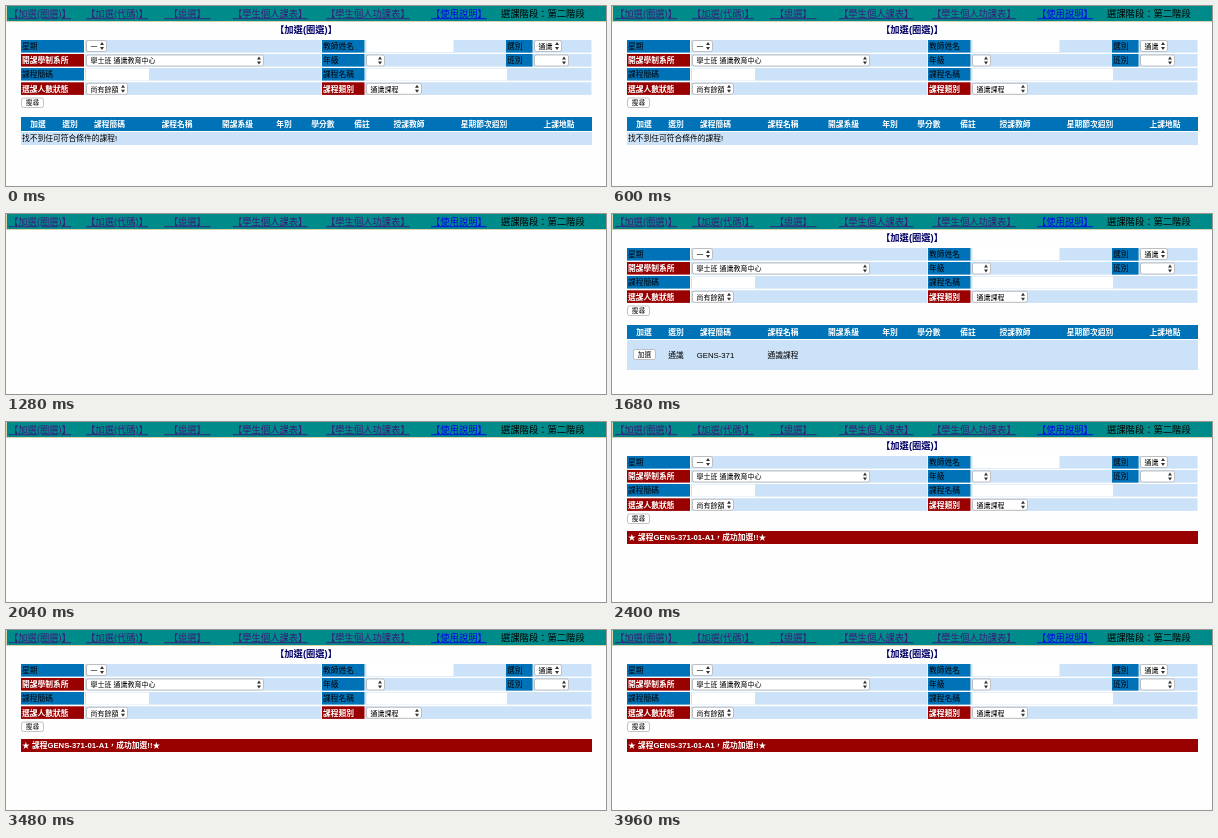
An HTML page for the animation above (4000 ms loop, 600 by 180 pixels).

```html
<!DOCTYPE html>
<html lang="zh-Hant">
<head>
<meta charset="utf-8">
<style>
html, body { margin: 0; width: 100%; height: 100%; overflow: hidden; background: #fefefe; }
svg { display: block; width: 600px; height: 180px; }
text { font-family: "Liberation Sans", "Noto Sans CJK TC", "Noto Sans CJK", sans-serif; white-space: pre; }
</style>
</head>
<body>
<svg id="stage" viewBox="0 0 600 180"></svg>
<script>
const BLUE = '#0072b8', RED = '#990000', PALE = '#cce2f8', TEAL = '#008b8b';
const LOOP = 4000;

const rect = (x, y, w, h, fill, extra = '') =>
  `<rect x="${x}" y="${y}" width="${w}" height="${h}" fill="${fill}" ${extra}/>`;
const text = (x, y, str, { size = 7.75, fill = '#000', weight = 400, anchor = 'start', line = 'none' } = {}) =>
  `<text x="${x}" y="${y}" font-size="${size}" fill="${fill}" font-weight="${weight}" text-anchor="${anchor}" text-decoration="${line}">${str}</text>`;
const label = (x, y, w, str, required) =>
  rect(x, y, w, 12.6, required ? RED : BLUE) +
  text(x + 1, y + 9.2, str, required ? { fill: '#fff', weight: 700 } : {});
const box = (x, y, w, h) => rect(x + .5, y + .5, w - 1, h - 1, '#fff', 'rx="2" stroke="#aaa" stroke-width=".7"');

function select(x, y, w, str = '') {
  const a = x + w - 5, m = y + 6;
  return box(x, y, w, 12) + text(x + 4.5, y + 8.8, str, { size: 7 }) +
    `<path d="M${a - 2} ${m - 1}l2-3 2 3zM${a - 2} ${m + 1}l2 3 2-3z" fill="#333"/>`;
}

function menu() {
  const links = [[3, '【加選(圈選)】'], [80, '【加選(代碼)】'], [158, '　【退選】　'],
    [227, '【學生個人課表】'], [320, '【學生個人功課表】'], [425, '【使用說明】']];
  return rect(1, 0, 599, 15, TEAL) + rect(0, 15, 600, 1, '#d9d2ae') + rect(0, 0, 1, 15, '#d9d2ae') +
    links.map(([x, str]) => text(x, 11.3, str, {
      size: 9.3, line: 'underline', fill: x === 425 ? '#0000ee' : '#3b1a7a'
    })).join('') +
    text(495, 11.3, '選課階段：第二階段', { size: 9.3, weight: 500 });
}

function form() {
  const rows = [34, 48, 62, 76.3];
  const [r1, r2, r3, r4] = rows;
  return text(300, 26.5, '【加選(圈選)】', { size: 9.3, weight: 700, fill: '#000066', anchor: 'middle' }) +
    rows.map(y => rect(79, y, 236.5, 12.6, PALE) + rect(359, y, 226.5, 12.6, PALE)).join('') +
    label(15, r1, 63, '星期') + label(316, r1, 42.5, '教師姓名') + label(500, r1, 26.5, '選別') +
    label(15, r2, 63, '開課學制系所', true) + label(316, r2, 42.5, '年級') + label(500, r2, 26.5, '班別') +
    label(15, r3, 63, '課程簡碼') + label(316, r3, 42.5, '課程名稱') +
    label(15, r4, 63, '選課人數狀態', true) + label(316, r4, 42.5, '課程類別', true) +
    rect(360.5, r1, 87, 12, '#fff') + rect(80, r3 + .5, 63, 12, '#fff') + rect(360.5, r3 + .5, 140.5, 12, '#fff') +
    select(80, r1, 21, '一') + select(528, r1, 28, '通識') +
    select(80, r2 + .5, 178, '學士班 通識教育中心') + select(360, r2 + .5, 19) + select(528, r2 + .5, 35) +
    select(80, r4 + .5, 42, '尚有餘額') + select(360, r4 + .5, 56, '通識課程') +
    box(15, 91.5, 23, 10.5) + text(26.5, 99.3, '搜尋', { size: 6.7, anchor: 'middle' });
}

function tableHead() {
  const columns = [[32, '加選'], [64, '選別'], [103.5, '課程簡碼'], [171, '課程名稱'], [231.5, '開課系級'],
    [278, '年別'], [317, '學分數'], [356, '備註'], [403, '授課教師'], [478, '星期節次週別'], [553, '上課地點']];
  return rect(15, 111, 571, 14, BLUE) +
    columns.map(([x, str]) => text(x, 120.8, str, { fill: '#fff', weight: 700, anchor: 'middle' })).join('');
}

const emptyResult = rect(15, 126, 571, 13, PALE) + text(16, 135.2, '找不到任可符合條件的課程!');
const foundCourse = rect(15, 126, 571, 30, PALE) + box(21, 135, 23, 11) +
  text(32.5, 143, '加選', { size: 6.7, anchor: 'middle' }) +
  text(64, 143.5, '通識', { anchor: 'middle' }) +
  text(103.5, 143.5, 'GENS-371', { anchor: 'middle' }) +
  text(171, 143.5, '通識課程', { anchor: 'middle' });
const success = rect(15, 109, 571, 13, RED) +
  text(16, 118.3, '★ 課程GENS-371-01-A1，成功加選!!★', { fill: '#fff', weight: 700 });

// Each page stays until its end time; the empty ones are page loads.
const pages = [
  [700, form() + tableHead() + emptyResult],
  [1480, ''],
  [1880, form() + tableHead() + foundCourse],
  [2140, ''],
  [LOOP, form() + success]
];

const stage = document.getElementById('stage');
stage.innerHTML = menu() + pages.map(([, content]) => `<g class="page">${content}</g>`).join('');
const groups = stage.querySelectorAll('.page');

function draw() {
  const time = performance.now() % LOOP;
  const current = pages.findIndex(([end]) => time < end);
  groups.forEach((group, i) => group.style.display = i === current ? '' : 'none');
  requestAnimationFrame(draw);
}
draw();
</script>
</body>
</html>
```
